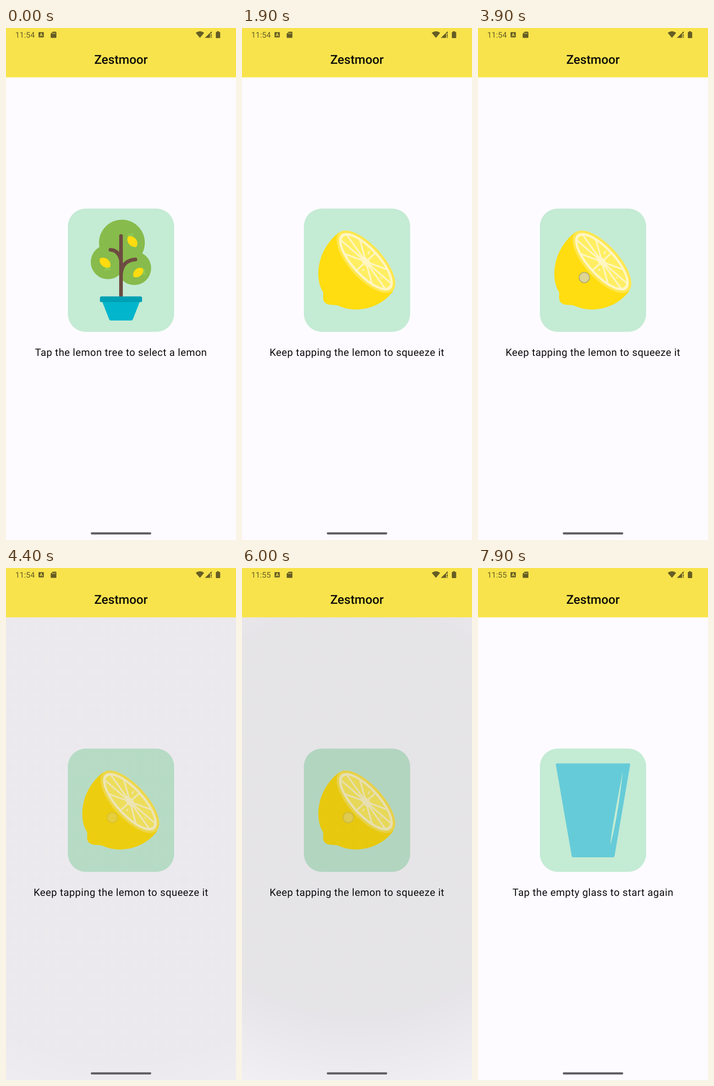
Animation, 502 px wide and 1115 px high, one loop 8 s. Source, as an HTML page:

```html
<!DOCTYPE html>
<html lang="en">
<head>
<meta charset="utf-8">
<title>Drink maker</title>
<style>
  html, body { margin: 0; width: 100%; height: 100%; overflow: hidden; background: #fdfbff; }
  svg { display: block; width: 502px; height: 1115px; font-family: Roboto, sans-serif; }
  text { text-anchor: middle; text-rendering: geometricPrecision; }
  .scene { display: none; }
  .scene.on { display: inline; }
  .spokes { fill: none; stroke: #fff6c3; vector-effect: non-scaling-stroke; }
  .caption { font-size: 22px; letter-spacing: .56px; fill: #0c0b0d; }
</style>
</head>
<body>
<svg viewBox="0 0 502 1115">
  <defs>
    <radialGradient id="shade">
      <stop offset=".48"/>
      <stop offset=".68" stop-opacity=".52"/>
      <stop offset=".85" stop-opacity=".15"/>
      <stop offset="1" stop-opacity="0"/>
    </radialGradient>
    <clipPath id="content"><path d="M0 107H502V1115H0z"/></clipPath>
    <path id="fruit" d="M-15 0C-10-12 9-13 14 0C9 12-10 12-15 0z" fill="#ffdb10"/>
    <path id="leaf" d="M0 0L-7-3L-5-8L0-6L5-9L7-3z" fill="#8cc955"/>
  </defs>

  <rect width="502" height="1115" fill="#fdfbff"/>
  <rect x="135" y="393.200" width="232" height="268.500" rx="39" fill="#c4ebd4"/>

  <g class="scene">
    <g fill="#87bb4b">
      <circle cx="253" cy="467.500" r="50"/>
      <circle cx="222.500" cy="509.500" r="37.500"/>
      <circle cx="280" cy="523" r="36.800"/>
    </g>
    <path d="M251 453V590M228 483Q246 484 251 506M282.500 504Q254 506 251 535" fill="none" stroke="#6d4c41" stroke-width="8" stroke-linecap="round"/>
    <use href="#leaf" transform="translate(272 455)"/>
    <use href="#leaf" transform="translate(221 521) rotate(175)"/>
    <use href="#leaf" transform="translate(297 532) rotate(85)"/>
    <use href="#fruit" transform="translate(276 465.500) rotate(51)"/>
    <use href="#fruit" transform="translate(216.500 511.500) rotate(40)"/>
    <use href="#fruit" transform="translate(289 532.500) rotate(-40) scale(.94)"/>
    <path d="M210 596H292L277 634Q276 637 273 637H229Q226 637 225 634z" fill="#00b5cc"/>
    <rect x="205" y="584.500" width="92" height="12.500" rx="3.500" fill="#00a0b4"/>
  </g>

  <g class="scene">
    <path d="M212 445C183 467 166.500 501 166.500 536C167 554 171 566 177 575C178 584 175 590 180 597C188 605 197 602 208 604C220 609 233 613 247 613C282 613 311 598 330 573z" fill="#ffdd10"/>
    <g transform="translate(270.500 509) rotate(47.500)">
      <ellipse rx="86" ry="36.500" fill="#ffe750"/>
      <ellipse rx="80" ry="31" fill="#fff6c3"/>
      <ellipse rx="73.500" ry="26" fill="#ffee62"/>
      <path class="spokes" data-count="10" data-phase=".5" transform="scale(75 28)" stroke-width="3.500"/>
      <ellipse rx="15" ry="7" fill="#fff6c3"/>
    </g>
    <path d="M275 494Q273 487 279 485Q279 491 275 494zM262 530L264 524L268 527zM301 541L307 546L302 545z" fill="#fff6c3"/>
  </g>

  <g class="scene">
    <path d="M164 459H301L296 492H166L161 463Q160 459 164 459z" fill="#66cbd9"/>
    <path d="M163.500 478C202 465 222 481 247 487C265 491 284 489 297 484L272 633Q271.500 636.500 269 636.500H193Q190.500 636.500 190 633z" fill="#ffee62"/>
    <g fill="#fff" fill-opacity=".53">
      <path d="M200 489Q203 487 205 490L229 521Q231 524 228 527L195 553Q191 556 188 552L175 535L169.500 511z"/>
      <path d="M209 532L246 535.500Q249 536 249 539L245.500 575Q245 578 242 578L206 574.500Q203 574 203 571L206 535Q206 532 209 532z"/>
      <path d="M214 564Q217 562 219 565L243 598Q245 601 242 604L210 627Q207 629 204 626L187 603L182 585z"/>
    </g>
    <path d="M175 508L198 491M244.500 543L242.500 571M210 620L238 601" stroke="#fffbe2" stroke-width="1.500" stroke-linecap="round"/>
    <path d="M285.500 495C283 532 275 580 264.500 612C267 580 274 540 281 495z" fill="#fff8c8"/>
    <g transform="translate(301 459)">
      <circle r="39.500" fill="#ffee62" stroke="#ffdb18" stroke-width="1.500"/>
      <circle r="34.500" fill="#ffee62" stroke="#fff6c3" stroke-width="3"/>
      <path class="spokes" data-count="8" data-phase=".18" transform="scale(34)" stroke-width="3"/>
      <circle r="6" fill="#fff6c3"/>
      <path d="M-5-17Q-7-22-3-23Q-1-20-5-17zM-20 6L-14 4L-16 8zM14 11L19 15L15 15z" fill="#fff6c3"/>
    </g>
  </g>

  <g class="scene">
    <path d="M173 425.500H329Q332.500 425.500 332 429L298 627Q297.500 630 294.500 630H208Q205 630 204.500 627L170 429Q169.500 425.500 173 425.500z" fill="#66cbd8"/>
    <path d="M316 443C312 486 300 566 289 603C291 571 305 502 316 443z" fill="#c4ebd4"/>
  </g>

  <g clip-path="url(#content)"><circle id="ripple" cx="251" cy="532" fill="url(#shade)"/></g>
  <text id="caption" class="caption" x="251" y="714"></text>

  <rect width="502" height="107.500" fill="#f8e34c"/>
  <text x="251" y="77.500" font-size="26.900" font-weight="500" fill="#0c0b08">Zestmoor</text>
  <g fill="#665d25">
    <text id="clock" x="41.500" y="20.500" font-size="17.100"></text>
    <rect x="71" y="9" width="11.500" height="11.500" rx="1"/>
    <path d="M102 8H108.500Q110 8 110 9.500V20Q110 21.500 108.500 21.500H99Q97.500 21.500 97.500 20V12.500z"/>
    <path d="M414 10.500Q423.500 3.500 432.500 10.500L423.300 21.500z"/>
    <path d="M434 21.500L449 7V12H445.500V21.500zM447 13.500H449V18.500H447zM447 19.500H449V21.500H447z"/>
    <path d="M460.500 8.500V7H464.500V8.500H466Q467.500 8.500 467.500 10V20.500Q467.500 22 466 22H459.500Q458 22 458 20.500V10Q458 8.500 459.500 8.500z"/>
  </g>
  <text x="76.800" y="18.400" font-size="10" font-weight="700" fill="#f8e34c">A</text>
  <path d="M101.500 10.500V13M104.200 10.500V13M106.900 10.500V13" stroke="#f8e34c" stroke-width="1.200"/>
  <rect x="185" y="1098.200" width="132" height="4.800" rx="2.400" fill="#625f64"/>

  <circle id="touch" cx="232" cy="543.500" r="11.300" fill="rgba(200,209,239,.6)" stroke="rgba(145,145,125,.65)" stroke-width="1.800"/>
</svg>
<script>
  const LOOP = 8000, STEP = 100;
  const captions = [
    'Tap the lemon tree to select a lemon',
    'Keep tapping the lemon to squeeze it',
    'Tap the beverage to drink it',
    'Tap the empty glass to start again'
  ];
  const changes = [1400, 6100, 7500];
  const taps = [1200, 2900, 3900, 4700, 5600, 7200];
  const el = id => document.getElementById(id);
  const scenes = document.querySelectorAll('.scene');
  const sceneAt = t => changes.filter(c => t >= c).length;
  const clamp = v => Math.max(0, Math.min(1, v));

  document.querySelectorAll('.spokes').forEach(path => {
    const { count, phase } = path.dataset;
    let d = '';
    for (let i = 0; i < +count; i++) {
      const a = (i + +phase) * 2 * Math.PI / count;
      d += `M0 0L${Math.cos(a)} ${Math.sin(a)}`;
    }
    path.setAttribute('d', d);
  });

  function draw(t) {
    const scene = sceneAt(t);
    scenes.forEach((s, i) => s.classList.toggle('on', i === scene));
    el('caption').textContent = captions[scene];
    el('clock').textContent = t < 5500 ? '11:54' : '11:55';

    const tap = taps.filter(p => p <= t).pop() ?? -LOOP;
    const age = t - tap;
    // The ripple belongs to the tapped picture and goes when that is replaced.
    const live = sceneAt(tap) === scene;
    el('ripple').setAttribute('r', Math.min(age, 800) * 2.3);
    el('ripple').setAttribute('opacity', live ? .117 * clamp((800 - age) / 500) : 0);
    el('touch').setAttribute('opacity', age < 300 ? 1 : clamp(.62 - (age - 300) / 700) * (age < 600));
  }

  function tick(now) {
    draw(Math.floor(now % LOOP / STEP) * STEP);
    requestAnimationFrame(tick);
  }
  draw(0);
  requestAnimationFrame(tick);
</script>
</body>
</html>
```
